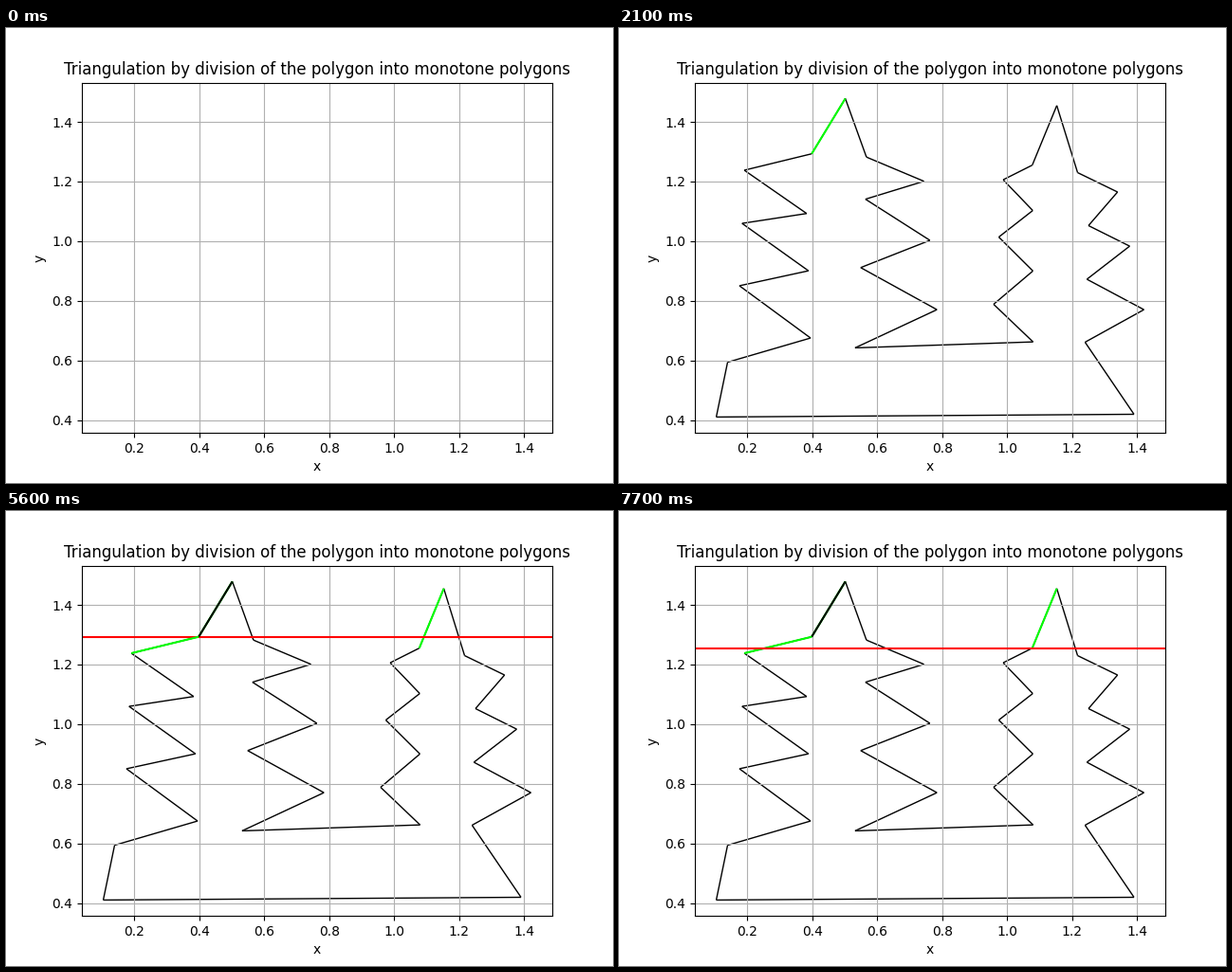
A matplotlib script for the animation above (8000 ms loop, 640 by 480 pixels).

```python
import matplotlib.pyplot as plt
import numpy as np
from matplotlib.animation import FuncAnimation
from matplotlib.collections import LineCollection

INTERVAL = 50   # ms per tick
HOLD = 7        # ticks per step of the sweep
TICKS = 160
EVENTS = 5


def side(shoulder, tips, notches):
    """One side of a tree, top to bottom: a shoulder, then three branches."""
    t = np.linspace(0, 1, 3)[:, None] ** 1.12   # lower branches sit wider apart
    tip, notch = (np.array(a) + t * np.subtract(b, a) for a, b in (tips, notches))
    zigzag = np.stack([tip, notch], axis=1).reshape(-1, 2)
    return np.vstack([shoulder, zigzag])


left = side((.3985, 1.293), [(.191, 1.238), (.176, .851)],
            [(.383, 1.093), (.395, .676)])
left_inner = side((.567, 1.282), [(.744, 1.201), (.784, .771)],
                  [(.564, 1.141), (.532, .643)])
right_inner = side((1.0775, 1.255), [(.988, 1.206), (.9585, .789)],
                   [(1.079, 1.103), (1.08, .663)])
right = side((1.217, 1.23), [(1.34, 1.165), (1.4212, .771)],
             [(1.2505, 1.0525), (1.24, .662)])
peaks = [(.502, 1.4781), (1.153, 1.4546)]
base = [(.1396, .595), (.1047, .4114), (1.3907, .4206)]

# Counterclockwise, starting at the left peak
verts = np.vstack([peaks[0], left, base, right[::-1],
                   peaks[1], right_inner, left_inner[::-1]])

fig, ax = plt.subplots(figsize=(6.4, 4.8), dpi=100)
ax.set_title('Triangulation by division of the polygon into monotone polygons')
ax.set_xlabel('x')
ax.set_ylabel('y')
ax.grid(True)

timeline = []   # (artist, first step, end step)


def show(artist, start, end=np.inf):
    timeline.append((artist, start, end))


def edge(i):
    return verts[[i, (i + 1) % len(verts)]]


outline = LineCollection([edge(i) for i in range(len(verts))],
                         colors='black', linewidths=1, zorder=1)
show(ax.add_collection(outline), 1)
ax.autoscale_view()

# Sweep down; on a left chain close the edge above and open the edge below
step = 2
for n, v in enumerate(np.argsort(-verts[:, 1])[:EVENTS]):
    x, y = verts[v]
    marks = []
    if verts[v - 1, 1] > y:
        marks.append((v - 1, 'black'))
    if edge(v)[1, 1] < y:
        marks.append((v, 'lime'))

    z = 2 + .08 * n
    dot_end = step + 2 + len(marks)
    show(ax.axhline(y, color='red', lw=1.5, zorder=z), step, dot_end + 1)
    show(ax.scatter([x], [y], s=36, color='blue', zorder=z + .02),
         step + 1, dot_end)
    for k, (i, color) in enumerate(marks):
        line, = ax.plot(*edge(i).T, color=color, lw=1.5,
                        solid_capstyle='butt', zorder=z + .04)
        show(line, step + 2 + k)
    step = dot_end + 2


def draw(tick):
    now = tick // HOLD
    for artist, start, end in timeline:
        artist.set_visible(start <= now < end)
    return [artist for artist, _, _ in timeline]


anim = FuncAnimation(fig, draw, frames=TICKS, interval=INTERVAL,
                     repeat=True, repeat_delay=0, blit=False)
plt.show()
```
